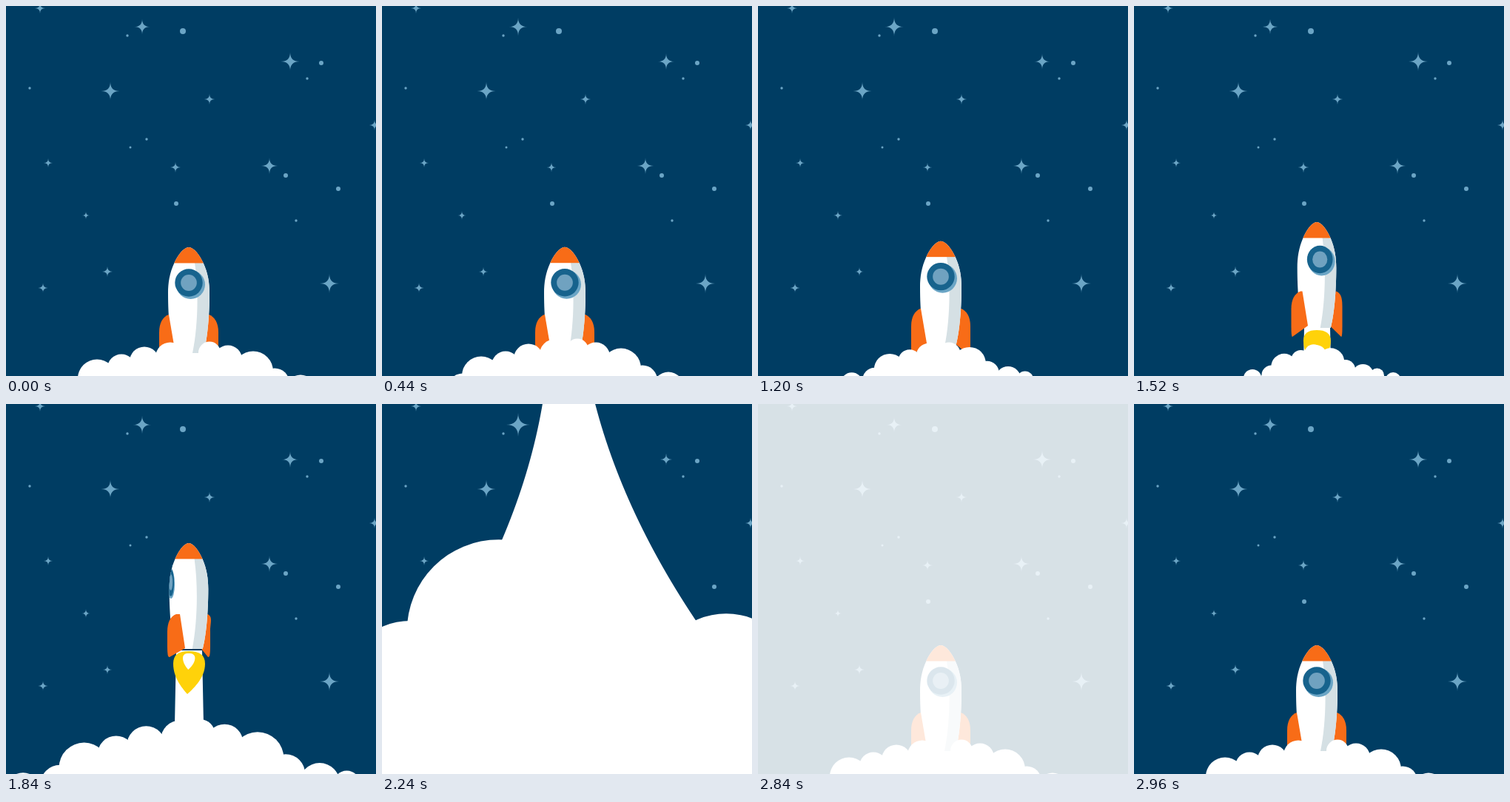
An HTML page with a canvas that plays this animation: 500 px wide and 500 px high, repeating every 3000 ms.

```html
<!DOCTYPE html>
<html lang="en">
<head>
<meta charset="utf-8">
<title>Rocket launch</title>
<style>
html, body { margin: 0; width: 100%; height: 100%; overflow: hidden; background: #003d63; }
canvas { display: block; width: 500px; height: 500px; }
</style>
</head>
<body>
<canvas id="stage" width="500" height="500"></canvas>
<script>
const ctx = document.getElementById('stage').getContext('2d');
const LOOP = 3000, STEP = 40, CX = 247, BASE = 510;
const NAVY = '#003d63', ORANGE = '#f86c17', SHADE = '#d5e0e4', STAR = '#6ba5c5';

const mix = (a, b, f) => a + (b - a) * f;
// Progress of t from a to b, held at 0 and 1 outside
const ramp = (t, a, b) => Math.max(0, Math.min(1, (t - a) / (b - a)));

// x, y, mean size, pulse
const stars = [
  [46, 3, 7, 0], [184, 28, 13, 3], [384, 75, 10.5, -2.5], [141, 115, 12.5, 0],
  [275, 126, 7, 0], [498, 161, 7, 0], [229, 218, 6, -1.2], [356, 216, 11, 0],
  [57, 212, 6, 0], [108, 283, 6, 1.2], [137, 359, 5.7, -1.5], [50, 381, 6.5, 0],
  [437, 375, 13, 0]
];
// x, y, radius
const dots = [
  [239, 34, 4], [426, 77, 3], [378, 229, 3], [449, 247, 3], [230, 267, 3],
  [164, 40, 1.7], [407, 98, 1.7], [32, 111, 1.7], [190, 180, 1.7], [168, 191, 1.5], [392, 290, 1.7]
];

// Puffs on each side: distance from the middle, height above the base, radius
const leftPuffs = [[4, 43, 20], [39, 37, 20], [70, 28, 19], [103, 14, 26], [128, -3, 20], [166, -9, 18]];
const rightPuffs = [[7, 49, 15], [32, 40, 19], [66, 24, 27], [95, 8, 20], [130, -2, 21], [158, -3, 14], [190, -12, 15]];
// The cloud gathers inwards, then bursts: time, scale, inward pull, lift
const burst = [
  [0, 1, -21, -7.5], [840, 1, 0, 0], [1520, .68, 26, 13],
  [1840, 1.31, -6.5, 0], [2240, 4.77, 402, 136], [2520, 9, 900, 450]
];

function ellipse(x, y, rx, ry, color) {
  ctx.fillStyle = color;
  ctx.beginPath();
  ctx.ellipse(x, y, rx, ry, 0, 0, Math.PI * 2);
  ctx.fill();
}

function drawSky(t) {
  ctx.fillStyle = NAVY;
  ctx.fillRect(0, 0, 500, 500);
  const wave = Math.cos((t - 840) / 1400 * Math.PI * 2);
  ctx.fillStyle = STAR;
  for (const [x, y, size, pulse] of stars) {
    const r = size + pulse * wave;
    ctx.beginPath();
    ctx.moveTo(x, y - r);
    for (const [dx, dy] of [[1, 0], [0, 1], [-1, 0], [0, -1]]) {
      ctx.quadraticCurveTo(x, y, x + dx * r, y + dy * r);
    }
    ctx.fill();
  }
  for (const [x, y, r] of dots) ellipse(x, y, r, r, STAR);
}

// A column of smoke whose edges flare out after lift-off
function drawTrail(t, bottom) {
  const q = Math.max(0, (t - 1840) / 400), k = q * q;
  const top = Math.max(-5, bottom);
  const left = y => 230 - 13 * k - k * (.15 * y + .0007 * y * y) - (y - top) * .02;
  const right = y => 265 + 23 * k + k * (.24 * y + .0007 * y * y) + (y - top) * .02;
  ctx.fillStyle = '#fff';
  ctx.beginPath();
  for (let y = top; y < BASE; y += 10) ctx.lineTo(left(y), y);
  for (let y = BASE; y > top; y -= 10) ctx.lineTo(right(y), y);
  ctx.lineTo(right(top), top);
  ctx.fill();
}

// side is -1 or 1; the near fin slides across the body as the rocket turns
function drawFin(side, swing, slide) {
  const out = 40 - 11 * swing, root = 27 - 10 * swing * slide, y = 91 + 5 * swing;
  ctx.save();
  ctx.scale(side, 1);
  ctx.fillStyle = ORANGE;
  ctx.beginPath();
  ctx.moveTo(root, y);
  ctx.bezierCurveTo(root + 8, y + 3, out, y + 11, out, y + 24);
  ctx.lineTo(out, 140);
  ctx.quadraticCurveTo(out, 156, out - 3 * swing, 156 - 2 * swing);
  ctx.lineTo(19 - 14 * swing * slide, 138 + 4 * swing);
  ctx.lineTo(root - 5 * swing * slide, y);
  ctx.fill();
  ctx.restore();
}

function bodyPath() {
  ctx.beginPath();
  ctx.moveTo(0, 0);
  ctx.bezierCurveTo(7, 0, 15, 11, 19.5, 21);
  ctx.bezierCurveTo(26, 35, 28, 48, 28, 62);
  ctx.bezierCurveTo(28, 95, 25, 125, 20, 143);
  ctx.lineTo(-20, 143);
  ctx.bezierCurveTo(-25, 125, -28, 95, -28, 62);
  ctx.bezierCurveTo(-28, 48, -26, 35, -19.5, 21);
  ctx.bezierCurveTo(-15, 11, -7, 0, 0, 0);
}

function drawWindow(t, swing) {
  const spin = 276 * (Math.max(0, t - 1445) / 395) ** 2 * Math.PI / 180;
  const face = Math.cos(spin);
  if (face < -.15) return;
  const x = 26 * Math.sin(spin), y = 48 + 5 * swing;
  const rx = Math.max(.5, 15.7 * face + 3);
  ellipse(x + 2.5 * Math.abs(face), y + 2.5, rx + .8, 19.5, STAR);
  ellipse(x, y, rx, 18.7, '#17638d');
  ellipse(x, y, rx * .58, 11, '#70a2c0');
}

function drawBody(t, swing) {
  ctx.save();
  ctx.scale(1 - .06 * ramp(swing, 0, .5), 1);
  bodyPath();
  ctx.fillStyle = '#fff';
  ctx.fill();
  ctx.clip();
  ctx.fillStyle = SHADE;
  ctx.beginPath();
  ctx.moveTo(8, 21);
  ctx.bezierCurveTo(14, 60, 12, 110, 5, 143);
  ctx.lineTo(40, 143);
  ctx.lineTo(40, 21);
  ctx.fill();
  ctx.fillStyle = ORANGE;
  ctx.fillRect(-30, -1, 60, 22.5);
  drawWindow(t, swing);
  ctx.restore();
}

function drop(y, size, color) {
  ctx.save();
  ctx.translate(0, y);
  ctx.scale(size, size);
  ctx.fillStyle = color;
  ctx.beginPath();
  ctx.moveTo(0, 0);
  ctx.bezierCurveTo(14, 0, 22, 5, 22, 17);
  ctx.bezierCurveTo(22, 35, 8, 49, -2, 58);
  ctx.bezierCurveTo(-10, 49, -21, 35, -21, 17);
  ctx.bezierCurveTo(-21, 5, -14, 0, 0, 0);
  ctx.fill();
  ctx.restore();
}

function drawFlame(t) {
  drop(146, .86 * ramp(t, 1200, 1440) + .14 * ramp(t, 1520, 1840), '#ffd20a');
  drop(149, .38 * ramp(t, 1600, 1760), '#fff');
}

function drawRocket(t, nose) {
  const swing = ramp(t, 1200, 1840);
  ctx.save();
  ctx.translate(CX, nose);
  drawFin(1, swing, .2);
  drawBody(t, swing);
  drawFin(-1, swing, 1);
  drawFlame(t);
  ctx.restore();
}

// Scale changes at a constant rate of growth, the shifts follow it
function cloudAt(t) {
  const i = Math.max(1, burst.findIndex(key => key[0] > t));
  const a = burst[i - 1], b = burst[i];
  const u = ramp(t, a[0], b[0]), ratio = b[1] / a[1];
  const f = ratio === 1 ? u : (ratio ** u - 1) / (ratio - 1);
  return [1, 2, 3].map(n => mix(a[n], b[n], f));
}

function drawSmoke(puffs, side, t) {
  const [scale, pull, lift] = cloudAt(t);
  for (const [far, high, size] of puffs) {
    const d = far * scale - pull, y = BASE - high * scale - lift;
    // puffs that pass the middle shrink away
    const r = size * scale * ramp(d, -14, -4);
    if (!r) continue;
    const x = CX + side * d;
    ellipse(x, y, r, r, '#fff');
    if (y < 500) ctx.fillRect(x - r, y, 2 * r, 500 - y);
  }
}

function drawScene(t) {
  const nose = 326 - 34 * Math.exp(.00438 * (t - 1520));
  drawSky(t);
  drawTrail(t, nose + 142 + 3 * ramp(t, 1520, 1840));
  drawRocket(t, nose);
  drawSmoke(leftPuffs, -1, t);
  drawSmoke(rightPuffs, 1, t);
}

function frame(now) {
  const t = Math.floor((now % LOOP) / STEP) * STEP;
  if (t < 2520) {
    drawScene(t);
  } else {
    const u = ramp(t, 2800, 2960);
    drawScene(0);
    ctx.fillStyle = `rgba(255,255,255,${1 - u * u * (3 - 2 * u)})`;
    ctx.fillRect(0, 0, 500, 500);
  }
  requestAnimationFrame(frame);
}
frame(0);
</script>
</body>
</html>
```
